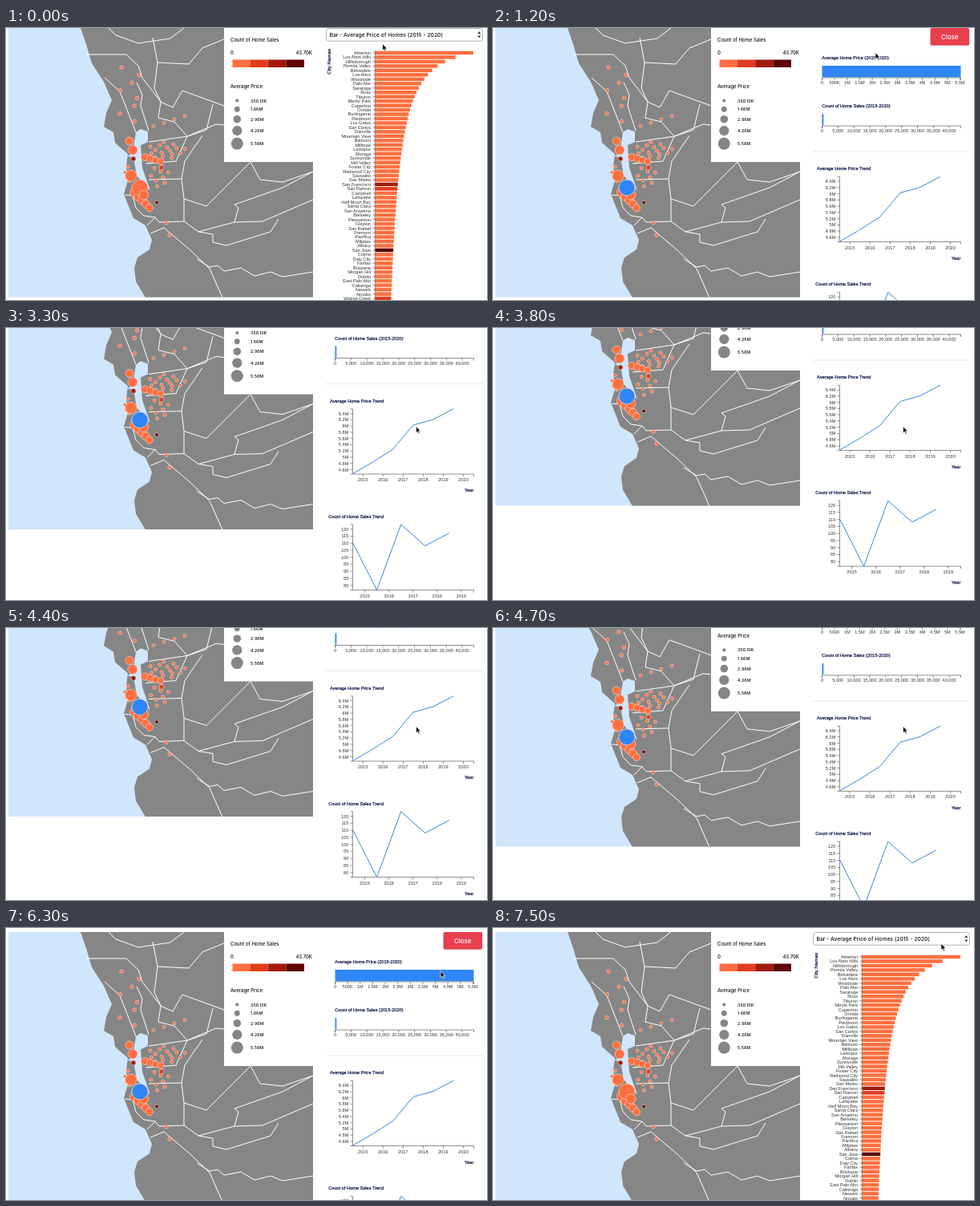
Write an HTML page that moves like this. It is 600x339 px and loops after 7.6 s.

```html
<!DOCTYPE html>
<html lang="en">
<head>
<meta charset="utf-8">
<title>Home sales map</title>
<style>
  html, body { margin: 0; width: 100%; height: 100%; overflow: hidden; background: #fff; }
  svg { display: block; width: 600px; height: 339px; font-family: "Liberation Sans", Arial, sans-serif; }
  text { fill: #222; }
  .ui { font: 500 6px Inter, sans-serif; fill: #111; }
  .key { font-size: 5.4px; }
  .select { font-size: 6.75px; }
  .close { font-size: 7.9px; fill: #fff; }
  .title { fill: #1b2350; stroke: #1b2350; stroke-width: .25px; font-size: 5.6px; }
  .names { font-size: 6.2px; }
  .tick { font-size: 5.6px; fill: #333; }
  .axis { fill: none; stroke: #444; stroke-width: .6px; }
  .line { fill: none; stroke: #3a86ea; stroke-width: 1px; }
  .border { fill: none; stroke: #fff; stroke-width: 1px; stroke-linejoin: round; }
</style>
</head>
<body>
<svg viewBox="0 0 600 339">
  <defs><clipPath id="frame"><rect x="3" width="380" height="335.5"/></clipPath></defs>
  <g id="page">
    <g clip-path="url(#frame)">
      <rect x="3" width="380" height="336" fill="#d0e6fd"/>
      <path fill="#868686" d="M93 0L100 20L107 44L122 67L132 90L125 106L122 123L134 130L136 143L152 157L150 172L152 190L147 207L159 237L174 246L182 264L179 276L164 286L160 299L162 316L174 336H384V0Z"/>
      <path fill="#d0e6fd" d="M162 130L168 126L177 129L177 142L168 146L170 174L180 203L163 184L159 161L151 160L158 156Z"/>
      <g class="border">
        <path d="M100 33H150L165 47L170 62L193 92L208 99L220 78L272 97"/>
        <path d="M128 0L137 9L165 19L205 13L222 0M183 12L189 43L228 45L245 25L272 14"/>
        <path d="M163 68L170 83L168 97L178 128M123 62L142 79L162 130M189 43L185 75L193 92L190 112"/>
        <path d="M178 142L226 135L250 127L258 95M190 112L210 117L226 135L212 166L174 169"/>
        <path d="M226 135L262 120L272 121M245 134L223 166L219 188L178 189"/>
        <path d="M219 188L222 213L250 222L305 167L317 189L345 192L383 179L345 199L285 220"/>
        <path d="M148 208L158 209L162 224L172 234L186 236L191 242L222 241V213M176 246L186 236"/>
        <path d="M180 256L197 249L230 277L254 300L270 336M222 241L240 254L285 242L290 224L285 220"/>
        <path d="M285 242L320 241L383 214M240 254L258 257V267L275 271L330 254L340 238"/>
        <path d="M238 288L254 298L264 296L272 303L293 299L310 309L330 304L345 310L383 304"/>
      </g>
      <g id="dots" stroke="#f6ddd4" stroke-width=".6"></g>
    </g>
    <g id="legend"><rect x="272" width="114" height="167" fill="#fff"/></g>
    <g id="list"></g>
    <g id="detail"></g>
  </g>
  <path id="cursor" d="M0 0V8.4L1.9 6.7L3.3 9.7L4.7 9L3.3 6.2H5.9Z" fill="#111" stroke="#fff" stroke-width=".7"/>
</svg>
<script>
const $ = id => document.getElementById(id);
const ORANGE = '#ff6f3f', RED = '#e23c20', MAROON = '#a01c0a', DARK = '#5e0303';
const BLUE = '#2f86f6', GREY = '#868686';

function add(parent, tag, attrs, label) {
  const el = document.createElementNS('http://www.w3.org/2000/svg', tag);
  for (const k in attrs) el.setAttribute(k, attrs[k]);
  if (label !== undefined) el.textContent = label;
  parent.appendChild(el);
  return el;
}
const rect = (p, x, y, width, height, fill, rx = 0) => add(p, 'rect', { x, y, width, height, fill, rx });
const dot = (p, cx, cy, r, fill = ORANGE) => add(p, 'circle', { cx, cy, r, fill });
const path = (p, d, cls) => add(p, 'path', { d, class: cls });
const text = (p, x, y, label, cls, anchor = 'start', more = {}) =>
  add(p, 'text', { x, y, class: cls, 'text-anchor': anchor, ...more }, label);
const range = (n, f) => Array.from({ length: n }, (_, i) => f(i));

// Map circles: loose clusters of small towns, two chains, then the main cities
const dots = $('dots');
function cluster(cx, cy, rx, ry, n) {
  for (let i = 0; i < n; i++) {
    const d = Math.sqrt((i + .5) / n), a = i * 2.4;
    dot(dots, cx + rx * d * Math.cos(a), cy + ry * d * Math.sin(a), 2);
  }
}
function chain(x, y, dx, dy, n, r, dr) {
  for (let i = 0; i < n; i++) dot(dots, x + i * dx, y + i * dy, r + i * dr);
}
range(8, i => dot(dots, 155 + 13 * Math.sin(i * 2 - 1), 49 + i * 9.6, 2.2));
range(4, i => dot(dots, 184 + i * 13, 122 - i * 4, 1.9));
cluster(200, 153, 26, 11, 16);
cluster(192, 186, 15, 13, 8);
cluster(152, 182, 4, 13, 5);
chain(200, 243, 4, 15, 2, 2.2, 0);
chain(173, 161, 6.7, 1.8, 4, 4.6, -.2);
chain(161, 205, 4.5, 4.8, 5, 6.5, -.5);
dot(dots, 154, 141, 5);
dot(dots, 158, 152, 6);
dot(dots, 156, 184, 7.2);
dot(dots, 167, 199, 10);
dot(dots, 172, 208, 6);
dot(dots, 194, 174, 3, RED);
dot(dots, 159, 163, 3, MAROON);
dot(dots, 188, 217.5, 2.3, DARK);
const chosen = dot(dots, 167, 199, 10, BLUE);

// Legend
const legend = $('legend');
text(legend, 280, 17, 'Count of Home Sales', 'ui');
text(legend, 280, 32.5, '0', 'ui');
text(legend, 382, 32.5, '43.70K', 'ui', 'end');
[ORANGE, RED, MAROON, DARK].forEach((c, i) => rect(legend, 282.5 + i * 22.35, 39.5, 22.4, 9.5, c));
text(legend, 280, 75.3, 'Average Price', 'ui');
['356.10K', '1.66M', '2.96M', '4.26M', '5.56M'].forEach((label, i) => {
  const y = 90.5 + 9.8 * i + .9 * i * i;
  dot(legend, 288.3, y, 2.1 + i * 1.35, GREY);
  text(legend, 305, y + 2, label, 'ui key');
});

// City list
const list = $('list');
const cities = ('Atherton,Los Altos Hills,Hillsborough,Portola Valley,Belvedere,Los Altos,Woodside,Palo Alto,' +
  'Saratoga,Ross,Tiburon,Menlo Park,Cupertino,Orinda,Burlingame,Piedmont,Los Gatos,San Carlos,Danville,' +
  'Mountain View,Belmont,Millbrae,Larkspur,Moraga,Sunnyvale,Mill Valley,Foster City,Redwood City,Sausalito,' +
  'San Mateo,San Francisco,San Ramon,Campbell,Lafayette,Half Moon Bay,Santa Clara,San Anselmo,Berkeley,' +
  'Pleasanton,Clayton,San Rafael,Fremont,Pacifica,Milpitas,Albany,San Jose,Colma,Daly City,Fairfax,Brisbane,' +
  'Morgan Hill,Dublin,East Palo Alto,Calistoga,Newark,Novato,Walnut Creek').split(',');
const barColor = { 'San Francisco': MAROON, 'San Ramon': RED, 'San Jose': DARK, 'Walnut Creek': RED };
const barWidth = i => 122.5 / (1 + .36 * i ** .93) ** .65;
rect(list, 399.5, .5, 195, 15.7, '#fff', 3).setAttribute('stroke', '#b5b5b5');
text(list, 403.5, 10.8, 'Bar - Average Price of Homes (2015 - 2020)', 'ui select');
add(list, 'path', { d: 'M588.3 7.2L590.3 4L592.3 7.2ZM588.3 9.4L590.3 12.6L592.3 9.4Z', fill: '#333' });
text(list, 0, 0, 'City Names', 'title names', 'middle', { transform: 'translate(405.2 41.8) rotate(-90)' });
cities.forEach((name, i) => {
  const y = 31 + i * 5.464;
  text(list, 455, y + 2, name, 'tick', 'end');
  path(list, `M457.5 ${y}H460.5`, 'axis');
  rect(list, 460.5, y - 2.25, barWidth(i), 4.5, barColor[name] || ORANGE);
});
path(list, 'M460.3 28V345', 'axis');

// Detail panel
const detail = $('detail');
rect(detail, 545.5, 0, 48.7, 21.8, '#e6404f', 2);
text(detail, 569.8, 13.8, 'Close', 'ui close', 'middle');

function barPanel(y, title, width, labels, step) {
  text(detail, 410.3, y, title, 'title');
  rect(detail, 410.5, y + 8, width, 14.3, BLUE);
  path(detail, `M410.5 ${y + 26}V${y + 23}H583.5V${y + 26}`, 'axis');
  labels.forEach((label, i) => {
    const x = 410.5 + i * step;
    path(detail, `M${x} ${y + 23}v3`, 'axis');
    text(detail, x, y + 31.2, label, 'tick', 'middle');
  });
}
const money = v => v === 0 ? '0' : v < 1 ? v * 1000 + 'K' : +v.toFixed(1) + 'M';
barPanel(39, 'Average Home Price (2015-2020)', 173, range(12, i => money(i / 2)), 15.64);
barPanel(99, 'Count of Home Sales (2015-2020)', 1.8, range(9, i => i ? i * 5 + ',000' : '0'), 19.83);
rect(detail, 399, 153.7, 196, .7, '#ddd');

function trend(o) {
  const { top, base } = o;
  text(detail, o.titleX, top - 8.3, o.title, 'title');
  path(detail, `M429.5 ${top}H432.5V${base}H429.5M432.5 ${base}H583.5v3`, 'axis');
  o.labels.forEach((label, i) => {
    const y = top + 5.8 + i * o.dy;
    path(detail, `M429.5 ${y}h3`, 'axis');
    text(detail, 427.3, y + 2, label, 'tick', 'end');
  });
  range(o.years, i => {
    const x = 432.5 + (i + .5) * o.dx;
    path(detail, `M${x} ${base}v3`, 'axis');
    text(detail, x, base + 9, 2015 + i, 'tick', 'middle');
  });
  path(detail, 'M' + o.values.map((y, i) => `${432.5 + i * o.dx} ${y}`).join('L'), 'line');
  text(detail, 583.3, base + 22.3, 'Year', 'title', 'end');
}
trend({
  title: 'Average Home Price Trend', titleX: 404, top: 185.3, base: 266.5, years: 6, dx: 25.1,
  labels: range(10, i => money(6.4 - i * .2)), dy: 7.77, values: [266, 251.5, 235.5, 205.5, 198.5, 185.3]
});
trend({
  title: 'Count of Home Sales Trend', titleX: 402.3, top: 329.3, base: 411, years: 5, dx: 30.1,
  labels: range(9, i => 120 - i * 5), dy: 8.77, values: [352, 411, 329.3, 356, 340]
});

// Timeline stops: [ms, values...]
const LOOP = 7600, OPEN = 1200, CLOSE = 7400;
const scroll = [[0, 0], [2500, 0], [3700, -114], [4140, -114], [5380, 5]];
const pointer = [[0, 469.7, 19.7], [900, 477, 30.5], [2400, 477, 30.5], [3000, 511.5, 122.5],
  [5400, 511.5, 122.5], [6300, 542, 53.5], [7100, 559, 19.2]];

function at(stops, t) {
  const n = stops.findIndex(s => s[0] > t);
  if (n < 0) return stops[stops.length - 1].slice(1);
  const a = stops[n - 1], b = stops[n], u = (t - a[0]) / (b[0] - a[0]);
  const ease = u * u * (3 - 2 * u);
  return a.slice(1).map((v, i) => v + (b[i + 1] - v) * ease);
}
const start = performance.now();
function draw(now) {
  const t = Math.floor(Math.max(0, now - start) % LOOP / 100) * 100;
  const open = t >= OPEN && t < CLOSE;
  $('page').setAttribute('transform', `translate(0 ${at(scroll, t)[0]})`);
  $('cursor').setAttribute('transform', `translate(${at(pointer, t).join(' ')})`);
  detail.style.display = chosen.style.display = open ? '' : 'none';
  list.style.display = open ? 'none' : '';
  requestAnimationFrame(draw);
}
draw(start);
</script>
</body>
</html>
```
